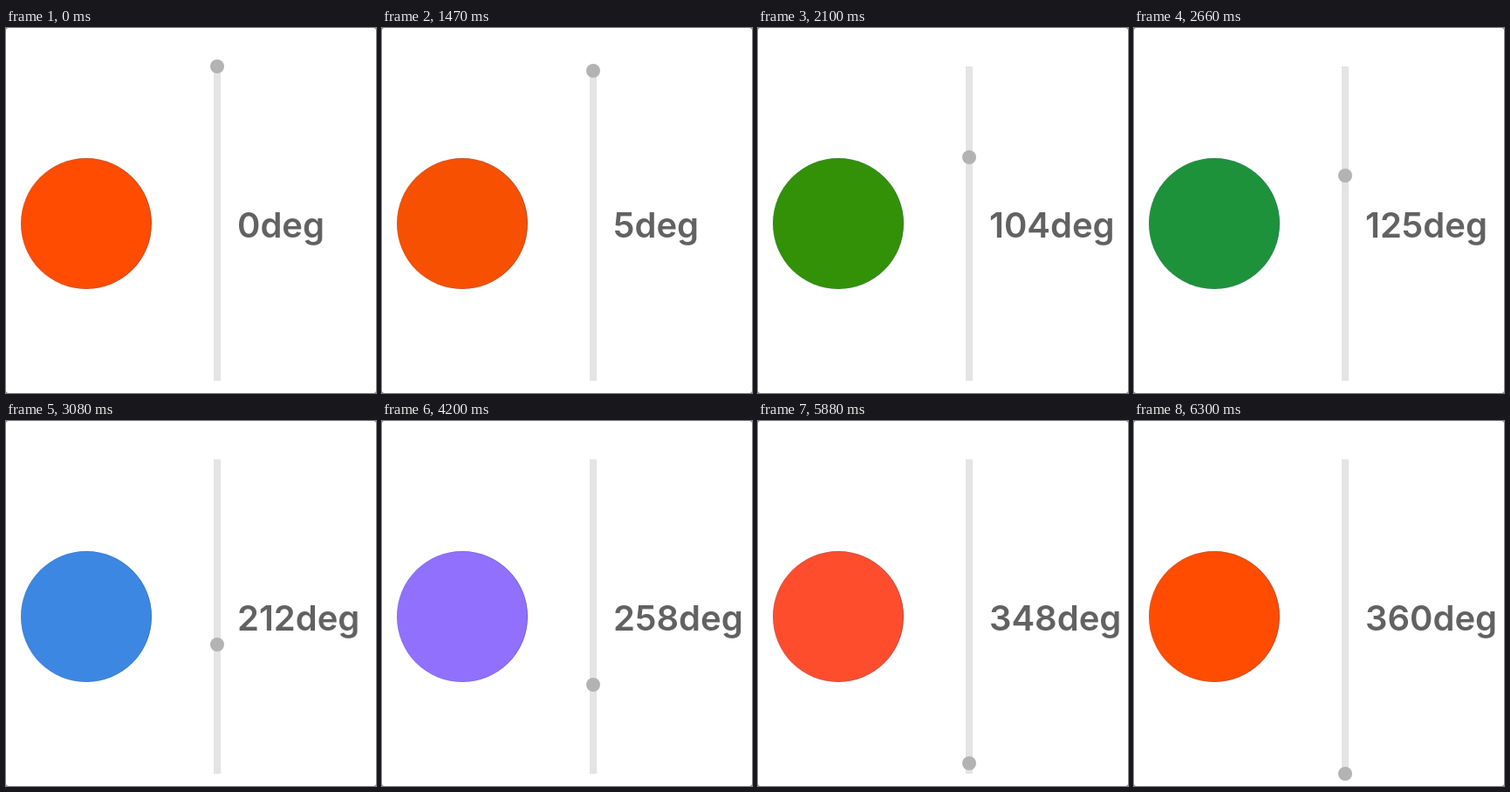
Write an HTML page that moves like this. It is 424 by 418 pixels and loops after 6.58 s.

```html
<!DOCTYPE html>
<html lang="en">
<head>
<meta charset="utf-8">
<title>Hue slider</title>
<style>
  html, body { margin: 0; width: 100%; height: 100%; overflow: hidden; background: #8a8a8a; }
  svg { display: block; width: 424px; height: 418px; }
  text {
    font: 600 40px Inter, "Liberation Sans", sans-serif;
    font-optical-sizing: none;
    font-variation-settings: "opsz" 14;
    fill: #626262;
  }
</style>
</head>
<body>
<svg viewBox="0 0 424 418">
  <linearGradient id="rim">
    <stop stop-color="#5a78a0" stop-opacity=".15"/>
    <stop offset="1" stop-color="#46648c" stop-opacity=".45"/>
  </linearGradient>
  <rect width="424" height="418" rx="3" fill="#fff"/>
  <circle id="ball" cx="92" cy="224" r="75"/>
  <circle cx="92" cy="224" r="74.5" fill="none" stroke="url(#rim)"/>
  <rect x="238" y="44" width="8" height="360" fill="#e4e4e4"/>
  <circle id="knob" cx="242" r="8" fill="#b3b3b3"/>
  <text id="label" x="265" y="240"></text>
</svg>
<script>
  const LOOP = 6580, STEP = 70, TRACK_TOP = 44;

  // Each pull of the knob starts where the previous one stopped.
  const pulls = [
    { start: 1361, length: 1005, to: 114 },
    { start: 2530, length: 850, to: 232 },
    { start: 3850, length: 350, to: 258 },
    { start: 4917, length: 1383, to: 360 }
  ];

  // Evenly spaced around the hue circle.
  const wheel = [
    [255, 76, 0], [176, 121, 0], [51, 145, 4], [0, 147, 130],
    [49, 138, 222], [143, 112, 255], [247, 82, 192]
  ];

  const mix = (a, b, u) => a + (b - a) * u;

  // Smoothstep leaning towards an early peak.
  function ease(u) {
    const v = 1 - (1 - u) ** 1.3;
    return v * v * (3 - 2 * v);
  }

  function degreesAt(time) {
    return pulls.reduce((deg, { start, length, to }) => {
      const u = Math.min(1, Math.max(0, (time - start) / length));
      return mix(deg, to, ease(u));
    }, 0);
  }

  function colorAt(deg) {
    const place = deg / 360 * wheel.length;
    const i = Math.floor(place);
    const from = wheel[i % wheel.length], to = wheel[(i + 1) % wheel.length];
    return `rgb(${from.map((c, k) => Math.round(mix(c, to[k], place - i)))})`;
  }

  const [ball, knob, label] = ["ball", "knob", "label"].map(id => document.getElementById(id));
  const start = performance.now();

  function draw() {
    const time = (performance.now() - start) % LOOP;
    const deg = Math.floor(degreesAt(Math.floor(time / STEP) * STEP));
    ball.setAttribute("fill", colorAt(deg));
    knob.setAttribute("cy", TRACK_TOP + deg);
    label.textContent = deg + "deg";
    requestAnimationFrame(draw);
  }
  draw();
</script>
</body>
</html>
```
